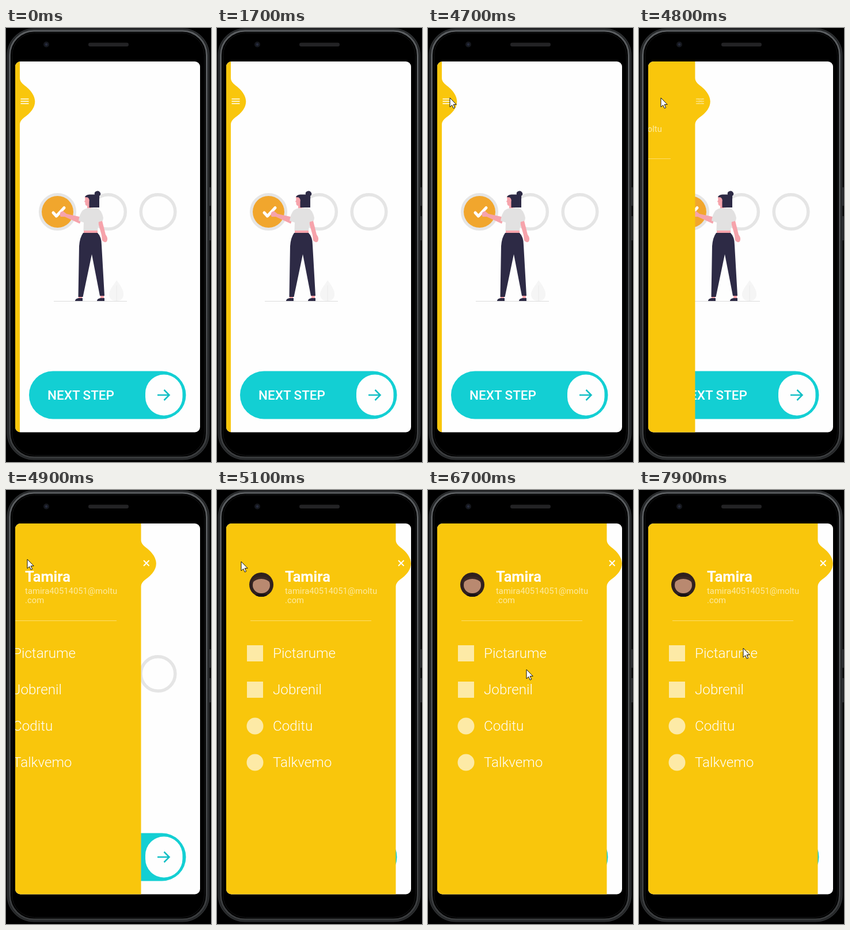
An HTML page that plays this animation: 356 px wide and 752 px high, repeating every 8000 ms.

```html
<!DOCTYPE html>
<html lang="en">
<head>
<meta charset="utf-8">
<title>Sidebar menu</title>
<style>
  html, body { margin: 0; width: 100%; height: 100%; overflow: hidden; background: #000; }
  svg { display: block; width: 100%; height: 100%; }
  text { font-family: Roboto, sans-serif; fill: #fff; }
  .name { font-size: 25.5px; font-weight: 700; }
  .mail { font-size: 14.8px; font-weight: 400; fill: #fdeaa0; }
  .item { font-size: 24.2px; font-weight: 300; }
  .next { font-size: 22.5px; font-weight: 500; }
  .line { fill: none; stroke-linecap: round; stroke-linejoin: round; }
</style>
</head>
<body>
<svg viewBox="0 0 356 752">
  <defs>
    <clipPath id="screen"><rect x="16" y="58" width="321" height="642.5" rx="9"/></clipPath>
    <clipPath id="portrait"><circle cx="77" cy="164" r="21"/></clipPath>
    <linearGradient id="rim" x2="0" y2="1">
      <stop offset="0" stop-color="#5a5d60"/>
      <stop offset=".5" stop-color="#4a4d50"/>
      <stop offset="1" stop-color="#3a3c3e"/>
    </linearGradient>
  </defs>

  <!-- phone -->
  <rect width="356" height="752" fill="#000"/>
  <path d="M354 276V308M354 326V368" stroke="#2d2f31" stroke-width="3"/>
  <rect x="2.500" y="1.500" width="350" height="746" rx="46" fill="#1f2122" stroke="#2c2e30" stroke-width="2"/>
  <rect x="6.500" y="5" width="342" height="739" rx="42" fill="#000" stroke="url(#rim)" stroke-width="3"/>
  <rect x="10.500" y="8.500" width="334" height="732" rx="39" fill="#000" stroke="#161718"/>
  <rect x="143" y="25.500" width="70" height="6.500" rx="3.200" fill="#232325"/>
  <circle cx="70" cy="28.500" r="5" fill="#15171d"/>
  <circle cx="70" cy="28.500" r="2.200" fill="#252b3d"/>

  <g clip-path="url(#screen)">
    <rect x="16" y="58" width="321" height="643" fill="#fefefe"/>

    <!-- illustration -->
    <g fill="none" stroke="#e5e5e5" stroke-width="5.500">
      <circle cx="89.500" cy="318.500" r="29.800"/>
      <circle cx="177.500" cy="318.500" r="29.800"/>
      <circle cx="264" cy="318.500" r="29.800"/>
    </g>
    <circle cx="89.500" cy="318.500" r="27.500" fill="#f1a62d"/>
    <path class="line" d="M82 320L87.500 326L101 311.500" stroke="#fff" stroke-width="5"/>
    <path d="M83 473.500H210" stroke="#dcdcdc"/>
    <path d="M192 437C199 446 205 455 204 463C203 470 198 473 192 473C185 473 180 470 179 463C178 455 186 447 192 437Z" fill="#f5f5f5"/>
    <path d="M192 446V473" stroke="#eaeaea"/>

    <g fill="#f6a3ab">
      <path d="M137 293H148V314H141V308Q137 308 137.500 302L136 301L137.500 298Z"/>
      <path d="M135 351H159V357H135Z"/>
      <path d="M132 328L128 339L102 327L95 327Q92 323 95 319L99 317L105 322Z"/>
      <path d="M159 334H167L173 358Q178 364 175 370Q171 373 167 368L166 359Z"/>
      <path d="M126 463H132V470H126ZM164 463H170V470H164Z"/>
    </g>
    <path d="M137 293Q138 289 145 288.500L154 288.500A5.200 4.700 0 1 1 162 291Q162.500 293 162 296V311H144.500V301Q145.500 296 142 293.500Z" fill="#2d2a45"/>
    <path d="M142 312H158Q166 315 169 329L168 334L161 336L159 351H134.500L135 337L126 334Q128 322 133 316Q137 313 142 312Z" fill="#e2e1e1"/>
    <path d="M134 355H159Q166 362 166 376L171 464H163L149 392L133.500 466H125.500L127 378Q128 363 134 355Z" fill="#2d2a45"/>
    <path d="M120 473Q120 469 126 468H133V473ZM158 473Q158 469 164 468H171V473Z" fill="#2d2a45"/>

    <!-- button -->
    <rect x="40" y="594.500" width="272.500" height="83" rx="41.500" fill="#13cfd3"/>
    <text class="next" x="72" y="644">NEXT STEP</text>
    <rect x="242" y="600.500" width="64.500" height="71" rx="32.250" fill="#fefefe"/>
    <path d="M263 636H283M274.500 627L283.500 636L274.500 645" fill="none" stroke="#13bfc5" stroke-width="2.500"/>

    <!-- drawer, laid out fully open -->
    <g id="drawer">
      <path d="M-300 58H310.500V87Q310.500 93 317.800 98.700Q336 112 336.800 127Q337 142 317.800 155.300Q310.500 161 310.500 167V701H-300Z" fill="#f9c60c"/>
      <path d="M58 226.500H268" stroke="#fcdd6c"/>
      <path id="menu" d="M312 123H326M312 127H326M312 131H326" stroke="#fff" stroke-width="1.600"/>
      <path id="close" d="M315 122L324.500 131.500M324.500 122L315 131.500" stroke="#fff" stroke-width="1.900"/>
    </g>
    <g id="content">
      <g clip-path="url(#portrait)">
        <rect x="55" y="142" width="44" height="44" fill="#30201f"/>
        <ellipse cx="77" cy="165" rx="15" ry="14" fill="#b98970"/>
        <path d="M60 162Q62 149 77 150Q92 149 94 162Q87 154 77 154Q67 154 60 162Z" fill="#3c2723"/>
        <ellipse cx="77" cy="186" rx="13" ry="7" fill="#191315"/>
      </g>
      <text class="name" x="118" y="159">Tamira</text>
      <text class="mail" x="118" y="179.500">tamira40514051@moltu</text>
      <text class="mail" x="118" y="196">.com</text>
      <g id="items"></g>
    </g>
  </g>

  <path id="cursor" d="M0 0V16L3.700 12.600L6.200 18.200L8.700 17.100L6.200 11.600H11.200Z" fill="#fff" stroke="#111" stroke-linejoin="round"/>
</svg>

<script>
const LOOP = 8000, STEP = 100;
const OPEN_AT = 4700, OPEN_TIME = 302, TRAVEL = 286.5, CONTENT_RATE = 1.118;

// time, x, y of the pointer tip
const pointerPath = [
  [3000, 242, 690], [3200, 233, 506], [3500, 118, 270], [3800, 37, 127],
  [4200, 38, 121], [4800, 38, 121], [4900, 37, 120], [5100, 42, 124],
  [5700, 42, 126], [6200, 140, 400], [6700, 171, 311], [7100, 145, 400],
  [7400, 128, 398], [7700, 170, 260], [7900, 181, 274]
];

const get = id => document.getElementById(id);
const [drawer, content, menu, close, cursor] =
  ['drawer', 'content', 'menu', 'close', 'cursor'].map(get);

get('items').innerHTML = ['Pictarume', 'Jobrenil', 'Coditu', 'Talkvemo'].map((label, i) => {
  const y = 283 + i * 63;
  const mark = i < 2
    ? `<rect x="52" y="${y - 14}" width="28" height="28" fill="#fdeaa6"/>`
    : `<circle cx="66" cy="${y}" r="14.500" fill="#fdeaa6"/>`;
  return `${mark}<text class="item" x="97" y="${y + 8}">${label}</text>`;
}).join('');

const clamp = v => Math.min(1, Math.max(0, v));
const easeInOut = p => p * p * (3 - 2 * p);
const move = (el, x, y = 0) => el.setAttribute('transform', `translate(${x.toFixed(2)} ${y.toFixed(2)})`);

function pointerAt(t) {
  const next = pointerPath.findIndex(k => k[0] > t);
  if (next < 0) return pointerPath.at(-1).slice(1);
  const [t0, x0, y0] = pointerPath[next - 1], [t1, x1, y1] = pointerPath[next];
  const p = (t - t0) / (t1 - t0);
  return [x0 + (x1 - x0) * p, y0 + (y1 - y0) * p];
}

function render(time) {
  const t = Math.floor(time % LOOP / STEP) * STEP;
  const open = easeInOut(clamp((t - OPEN_AT) / OPEN_TIME));
  const shift = (open - 1) * TRAVEL;
  move(drawer, shift);
  move(content, shift * CONTENT_RATE);
  menu.setAttribute('opacity', clamp(1 - open * 2));
  close.setAttribute('opacity', clamp(open * 2 - .4));

  const visible = t >= pointerPath[0][0];
  cursor.setAttribute('visibility', visible ? 'visible' : 'hidden');
  if (visible) move(cursor, ...pointerAt(t));
}

const start = performance.now();
function tick() {
  render(performance.now() - start);
  requestAnimationFrame(tick);
}
tick();
</script>
</body>
</html>
```
